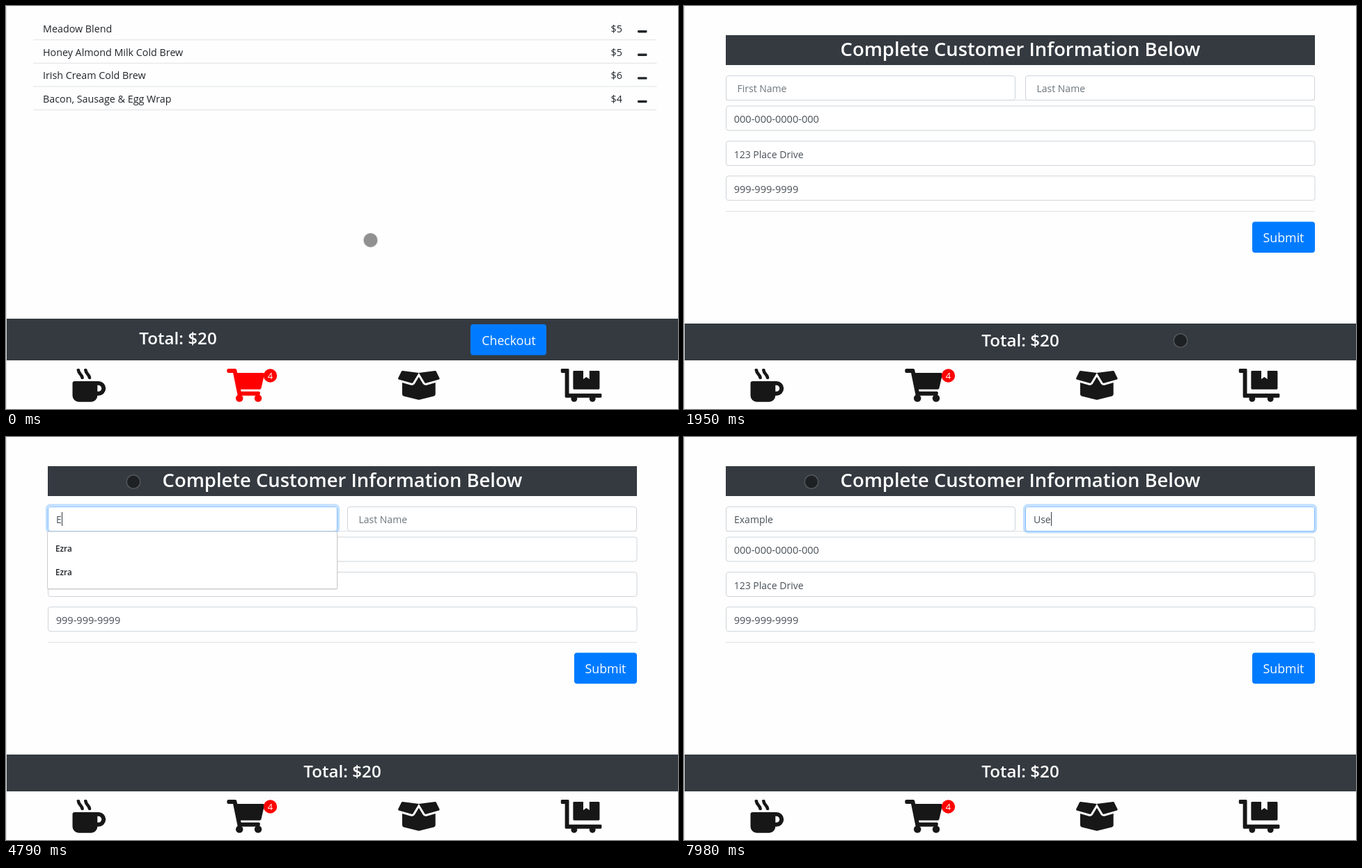
Write an HTML page that moves like this. It is 965 by 580 pixels and loops after 8000 ms.

```html
<!DOCTYPE html>
<html lang="en">
<head>
<meta charset="utf-8">
<title>Coffee shop checkout</title>
<style>
  html, body { margin: 0; width: 100%; height: 100%; overflow: hidden; background: #fefefe; }
  svg { display: block; width: 100%; height: 100%; font-family: "Open Sans", "Noto Sans", sans-serif; }
  text { white-space: pre; }
  .bar { fill: #343a40; }
  .line { stroke: #dee2e6; }
  .field { fill: #fff; stroke: #ced4da; }
  .ring { fill: none; stroke: #007bff; stroke-opacity: .25; stroke-width: 3; }
  .button { fill: #007bff; }
  .label { fill: #fff; font-size: 17.75px; text-anchor: middle; }
  .title { fill: #fff; font-weight: 600; text-anchor: middle; }
  .total { font-size: 24.2px; }
  .item { fill: #212529; font-size: 14.3px; font-weight: 500; }
  .value { fill: #495057; font-size: 14px; }
  .digits { font-size: 14.55px; }
  .hint { fill: #6c757d; font-size: 14px; }
  .option { fill: #212529; font-size: 11.7px; font-weight: 600; }
</style>
</head>
<body>
<svg viewBox="0 0 965 580">
  <path d="M.5 0V580" stroke="#ddd"/>

  <g id="cart">
    <g id="items"></g>
    <rect class="bar" x="1" y="450" width="964" height="60"/>
    <text class="title total" x="247" y="487">Total: $20</text>
    <rect class="button" x="667" y="458" width="109" height="44.5" rx="4"/>
    <text class="label" x="722" y="488">Checkout</text>
  </g>

  <g id="form">
    <rect class="bar" x="60" y="42" width="846" height="43"/>
    <text class="title" x="483" y="72" font-size="27.4">Complete Customer Information Below</text>
    <path class="line" d="M60 135.5H906M60 295.5H906"/>
    <g id="fields"></g>
    <g id="menu">
      <rect x="59" y="137" width="417.5" height="83" rx="3" fill="#000" opacity=".1"/>
      <rect x="59.5" y="136" width="416" height="82.5" rx="2" fill="#fff" stroke="#ccc"/>
      <text class="option" x="71" y="165">Ezra</text>
      <text class="option" x="71" y="199">Ezra</text>
    </g>
    <rect id="caret" y="108" width="1" height="20" fill="#343a40"/>
    <rect class="button" x="816" y="310.5" width="90" height="44.5" rx="4"/>
    <text class="label" x="861" y="340">Submit</text>
    <rect class="bar" x="1" y="457" width="964" height="53"/>
    <text class="title total" x="483" y="490">Total: $20</text>
  </g>

  <g fill="#171717">
    <g transform="translate(95.5 522) scale(.0932)">
      <path id="steam" d="M127 146q3 14 16 14h17q16-2 16-18-5-42-37-75-22-23-26-53Q110 0 97 0H80Q64 2 64 18q6 48 41 84 18 19 22 44z"/>
      <use href="#steam" x="112"/>
      <path d="M400 192H32q-32 0-32 32V416a96 96 0 0 0 96 96H288a96 96 0 0 0 96-96h16a112 112 0 0 0 0-224zm0 160h-16v-96h16a48 48 0 0 1 0 96z"/>
    </g>
    <g id="trolley" transform="translate(317.3 522) scale(.0932)">
      <path d="M24 0H126q19 0 24 19L159 64H552q28 3 23 29L528 301q-5 19-23 19H212l6 32H487q28 3 23 29l-8 35H166L94 64H24Q0 64 0 40V24Q0 0 24 0z"/>
      <circle cx="192" cy="456" r="56"/>
      <circle cx="480" cy="456" r="56"/>
    </g>
    <g transform="translate(563 522) scale(.0932)">
      <path id="flap" d="M53 41L2 144q-6 18 10 23l198 56q12 2 18-7L320 64 70 32q-11 0-17 9z"/>
      <use href="#flap" transform="matrix(-1 0 0 1 640 0)"/>
      <path d="M426 256q-27-1-42-23L320 126 256 233q-22 30-55 21L64 215V393q2 24 24 31l216 54q16 4 32 0l216-54q22-7 24-31V215L439 254z"/>
    </g>
    <g transform="translate(796.8 522) scale(.0915 .0932)">
      <path d="M208 320H592q16 0 16-16V48q0-16-16-16H448V160l-48-32-48 32V32H208q-16 0-16 16V304q0 16 16 16z"/>
      <path d="M624 384H128V16Q128 0 112 0H16Q0 0 0 16V48q0 16 16 16H64V432q0 16 16 16H624q16 0 16-16V400q0-16-16-16z"/>
      <circle cx="208" cy="464" r="48"/>
      <circle cx="496" cy="464" r="48"/>
    </g>
  </g>
  <circle cx="379.5" cy="532" r="9.7" fill="#f00"/>
  <text x="379.5" y="536.7" font-size="13" fill="#fff" text-anchor="middle">4</text>

  <circle id="pointer" r="9.7" fill="#000" fill-opacity=".43" stroke="#888" stroke-opacity=".45" stroke-width="1.5"/>
</svg>
<script>
const $ = id => document.getElementById(id);
const LOOP = 8000;

const items = [["Meadow Blend", 5], ["Honey Almond Milk Cold Brew", 5],
               ["Irish Cream Cold Brew", 6], ["Bacon, Sausage & Egg Wrap", 4]];
$("items").innerHTML = items.map(([name, price], i) => `
  <g transform="translate(0 ${i * 33.6})">
    <text class="item" x="53" y="38">${name.replace("&", "&amp;")}</text>
    <text class="item" x="868.5" y="38">$${price}</text>
    <rect x="907" y="35" width="13.5" height="3.4" rx="1.3" fill="#212529"/>
    <path class="line" d="M39 48.7H934.5"/>
  </g>`).join("");

const box = (x, y, w, id = "") => `<rect class="field" ${id} x="${x}" y="${y}" width="${w}" height="35" rx="3.5"/>`;
const nameField = (id, x, hint) => `
  <rect class="ring" id="${id}Ring" x="${x - 2}" y="98" width="419" height="39" rx="5"/>
  ${box(x, 100.5, 415, `id="${id}Box"`)}
  <text class="hint" id="${id}Hint" x="${x + 16}" y="124">${hint}</text>
  <text class="value" id="${id}" x="${x + 11.5}" y="124"></text>`;
const wideField = (y, text, style) => box(60.5, y, 845.5) +
  `<text class="value ${style}" x="71.7" y="${y + 24}">${text}</text>`;
$("fields").innerHTML = nameField("first", 60.5, "First Name") + nameField("last", 490.5, "Last Name") +
  wideField(144, "000-000-0000-000", "digits") + wideField(194.5, "123 Place Drive", "") +
  wideField(244.7, "999-999-9999", "digits");

// Pointer: time, x, y; it jumps from point to point
const path = [
  [0, 523.5, 337], [520, 546, 355], [640, 578, 381], [790, 618, 413], [910, 650, 439],
  [1030, 677, 459], [1150, 696, 473], [1300, 707, 479], [1420, 713, 481.5],
  [2230, 702, 475], [2350, 660, 452], [2470, 585, 412], [2590, 497, 364],
  [2750, 400, 280], [2870, 300, 180], [2990, 218, 98], [3110, 183, 64.5]];

// Each event changes only the listed parts of the state
const start = { page: "cart", first: "", last: "", caret: "", glow: [0, 0], menu: false };
const events = [
  [1950, { page: "form" }],
  [3770, { glow: [.6, 0], caret: "first" }],
  [3890, { glow: [1, 0] }],
  [4270, { caret: "" }],
  [4790, { first: "E", caret: "first", menu: true }],
  [5040, { first: "Ex", menu: false }],
  [5160, { first: "Exa" }],
  [5660, { caret: "" }],
  [5910, { first: "Exam", caret: "first" }],
  [6060, { first: "Examp" }],
  [6180, { first: "Exampl" }],
  [6300, { first: "Example" }],
  [6580, { glow: [.3, .7], caret: "last" }],
  [6700, { glow: [0, 1] }],
  [7070, { caret: "" }],
  [7600, { last: "U", caret: "last" }],
  [7850, { last: "Us" }],
  [7980, { last: "Use" }]];

const show = (id, on) => $(id).setAttribute("visibility", on ? "visible" : "hidden");
const mix = (a, b, k) => `rgb(${a.map((v, i) => Math.round(v + (b[i] - v) * k))})`;

function draw(t) {
  const past = list => list.filter(e => e[0] <= t);
  const s = Object.assign({}, start, ...past(events).map(e => e[1]));
  const [, x, y] = past(path).pop();
  $("pointer").setAttribute("transform", `translate(${x} ${y})`);

  for (const page of ["cart", "form"]) $(page).style.display = s.page === page ? "" : "none";
  $("trolley").style.fill = s.page === "cart" ? "#f00" : "";

  ["first", "last"].forEach((id, i) => {
    const k = s.glow[i];
    $(id).textContent = s[id];
    show(id + "Hint", !s[id]);
    $(id + "Ring").style.opacity = k < .5 ? 0 : k;
    $(id + "Box").style.stroke = mix([206, 212, 218], [128, 189, 255], k);
  });
  show("menu", s.menu);
  show("caret", s.caret);
  if (s.caret) {
    const field = $(s.caret);
    const width = s[s.caret] ? field.getComputedTextLength() : 0;
    $("caret").setAttribute("x", Math.round(+field.getAttribute("x") + width));
  }
}

function tick() {
  draw(performance.now() % LOOP);
  requestAnimationFrame(tick);
}
tick();
</script>
</body>
</html>
```
